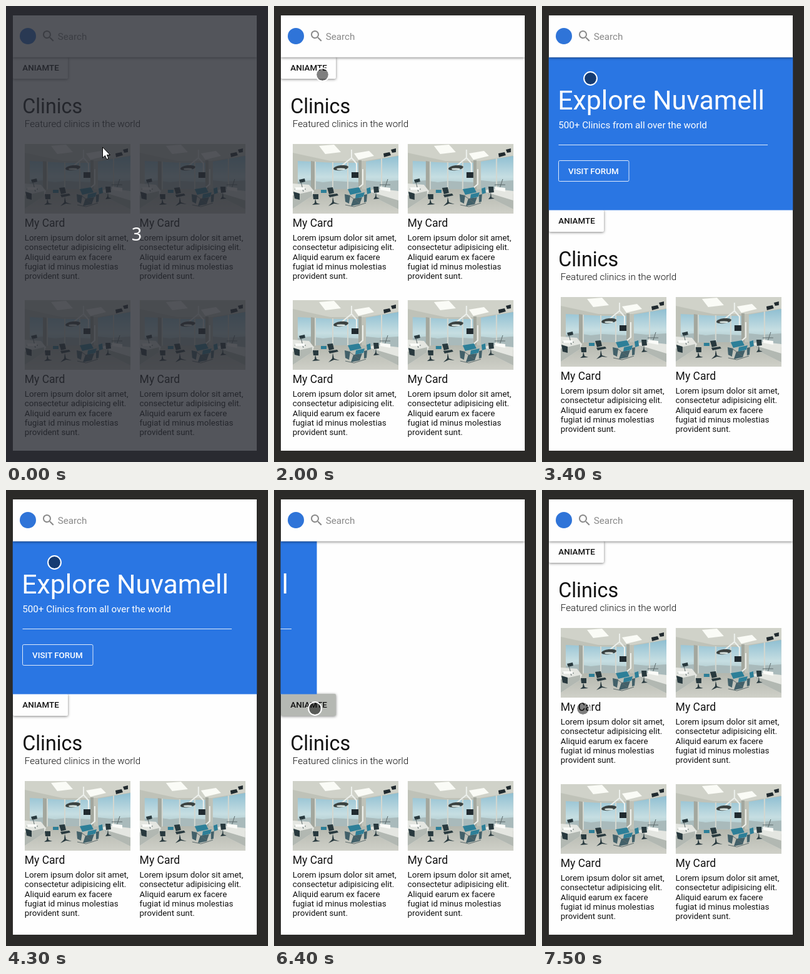
These frames come from a looping animation (419 px wide and 727 px high, 8 s). An HTML page:

```html
<!DOCTYPE html>
<html lang="en">
<head>
<meta charset="utf-8">
<title>Clinics</title>
<style>
html, body { margin: 0; width: 100%; height: 100%; overflow: hidden; background: #2b2a28; }
svg { display: block; width: 419px; height: 727px; font-family: Roboto, sans-serif; fill: #111; }
.btn { font-size: 13.4px; font-weight: 500; }
.h1 { font-size: 42.8px; }
.h2 { font-size: 32.3px; }
.h3 { font-size: 17.5px; }
.sub { font-size: 15.2px; }
.light { font-weight: 300; }
.body { font-size: 13.33px; }
.bar { fill: #fefefe; filter: drop-shadow(0 1px 2px rgba(0, 0, 0, .5)); }
</style>
</head>
<body>
<svg viewBox="0 0 419 727">
  <defs>
    <clipPath id="screen"><path d="M10.500 15h391v694h-391z"/></clipPath>
    <clipPath id="frame"><path d="M0 0h169v111H0z"/></clipPath>
    <linearGradient id="sky" x2="0" y2="1">
      <stop stop-color="#8fbfd2"/><stop offset=".6" stop-color="#c6dee2"/><stop offset="1" stop-color="#a5c0c2"/>
    </linearGradient>
    <linearGradient id="floor" x2="0" y2="1">
      <stop stop-color="#b4b7ae"/><stop offset="1" stop-color="#cfd0c8"/>
    </linearGradient>
    <g id="photo" clip-path="url(#frame)">
      <path fill="#bfc2b8" d="M0 0h169v111H0z"/>
      <path fill="#d0d2c9" d="M0 0h169v18L115 27H60L0 14z"/>
      <path fill="#fafbf6" d="M42 3l24-2 11 12-25 3zM98 15l24-4 8 8-25 6z"/>
      <path fill="url(#sky)" d="M8 27l57 3h40v43H8zM117 28l52-9v56l-52-4z"/>
      <path fill="#a9babb" d="M8 60l20-2 20 3 18-2 39 2v12H8zM117 58l20 2 32-2v17l-52-4z"/>
      <path stroke="#d3d7d0" stroke-width="2" d="M36 28v45M64 29v44M88 29v44M142 23v50"/>
      <path fill="#a3a79e" d="M29 27l6 1v45h-6zM105 26h5v48h-5z"/>
      <path fill="url(#floor)" d="M0 78l40-6h84l45 8v31H0z"/>
      <path fill="#e4e6e1" d="M0 63l26 2 8 10-3 8-31 20zM169 75l-35-4-10 3 6 11 39 19z"/>
      <path fill="#b2b8b2" d="M0 82l31-7v8L0 103zM169 90l-43-13 4 8 39 19z"/>
      <path fill="none" stroke="#edf0ec" stroke-width="2" d="M94 9v13L78 35M94 22l8 9v17M112 40v24l-9 8"/>
      <ellipse cx="77" cy="38" rx="12" ry="4" fill="#3b4241" transform="rotate(-7 77 38)"/>
      <ellipse cx="77" cy="40" rx="7" ry="1.6" fill="#dbe7e4"/>
      <path fill="#202a2f" d="M94 45h11v9H94zM145 15l10-2 2 5-11 3zM157 9l8-2v6l-6 1z"/>
      <g fill="#28393e">
        <path d="M55 70l9-1 2 9-8 2zM57 81l14-2 2 3-14 3zM32 80h9v8h-8zM129 68h8l1 9-8 1zM10 57l9-2 1 5-8 2zM1 76l10 3v10l-8-2z"/>
        <path d="M64 84l2 9 9 3-9-1-9 4 6-6zM36 87l2 7 6 2-13 1 4-3zM133 77l1 8 5 2-10 1 3-4z"/>
      </g>
      <path fill="#2d7f98" d="M88 72l18-3 4 8-18 4zM101 80l14-3-2 7-13 3zM118 71l6-2 1 9-6 2zM45 73h9v5h-9z"/>
      <path fill="#426069" d="M83 80l9 2-2 13-6-3zM97 87l14-2-4 11-14 3zM114 81l5-1-1 12-4 1z"/>
      <path fill="none" stroke="#5b696a" d="M84 97l14 3 19-6M90 82l18 13M13 60l4 16M152 56l-5 15M3 72h18M139 65h17"/>
      <path fill="#fafbf8" d="M4 69h15v4H4zM139 68l17 2v6l-16-3z"/>
    </g>
    <g id="card">
      <use href="#photo"/>
      <text class="h3" x="-.2" y="132">My Card</text>
      <g class="body" id="copy"></g>
    </g>
  </defs>

  <g clip-path="url(#screen)">
    <path fill="#fefefe" d="M11 15h390v694H11z"/>
    <g id="page">
      <rect class="bar" x="11" y="81" width="88" height="35" rx="2"/>
      <rect id="press" x="11" y="81" width="88" height="35" rx="2" fill="#0a1405"/>
      <text class="btn" x="26.3" y="103">ANIAMTE</text>
      <text class="h2" x="26.2" y="171">Clinics</text>
      <text class="sub light" x="29.8" y="193">Featured clinics in the world</text>
      <use href="#card" x="30" y="220"/>
      <use href="#card" x="213.8" y="220"/>
      <use href="#card" x="30" y="469"/>
      <use href="#card" x="213.8" y="469"/>
    </g>
    <g id="banner" fill="#fff">
      <path fill="#2a76e3" d="M10.500 81.500h391v244h-391z"/>
      <text class="h1" x="25.2" y="164.500">Explore Nuvamell</text>
      <text class="sub" x="26.2" y="195">500+ Clinics from all over the world</text>
      <path fill="none" stroke="#dfeafa" d="M26.500 221.500h334.500"/>
      <rect x="26.500" y="246.500" width="112.500" height="33" rx="2" fill="none" stroke="#dfeafa"/>
      <text class="btn" x="42" y="268">VISIT FORUM</text>
    </g>
    <path class="bar" d="M11 15h390v66.700H11z"/>
    <circle cx="35" cy="48" r="13" fill="#2f74d8"/>
    <path fill="#8a8a8a" transform="translate(56 36)" d="M15.5 14h-.8l-.3-.3A6.5 6.5 0 1 0 13.7 14.4l.3.3v.8l5 5 1.5-1.5zM9.5 14a4.5 4.5 0 1 1 0-9 4.5 4.5 0 0 1 0 9z"/>
    <text class="sub" x="82.7" y="54" fill="#8a8a8a">Search</text>
  </g>

  <g id="touch">
    <circle r="9.5" fill="#000" fill-opacity=".5"/>
    <circle r="10.4" fill="none" stroke="#fff" stroke-width="2"/>
  </g>
  <g id="shade">
    <path fill="#282b32" fill-opacity=".8" d="M0 0h419v727H0z"/>
    <text x="209" y="374" text-anchor="middle" fill="#fff" font-size="29" font-family="'Noto Sans', sans-serif">3</text>
  </g>
  <path id="arrow" fill="#fff" stroke="#000" d="M154.5 225v17l4-3.5 2.5 6 3-1.3-2.5-5.7h5z"/>
</svg>

<script>
const el = id => document.getElementById(id);
const clamp = v => Math.max(0, Math.min(1, v));

const copy = ["Lorem ipsum dolor sit amet,", "consectetur adipisicing elit.", "Aliquid earum ex facere",
  "fugiat id minus molestias", "provident sunt."];
el("copy").innerHTML = copy.map((s, i) => `<text x="-.2" y="${154 + i * 15.35}">${s}</text>`).join("");

const LOOP = 8000, STEP = 100, OPEN = 2500, CLOSE = 6200, COLLAPSE = 7500;

// pointer path: time, x, y
const path = [[300, 158, 240], [600, 165, 278], [700, 165, 278], [900, 183, 309], [1000, 190, 289],
  [1100, 190, 289], [1400, 121, 160], [1500, 121, 160], [1800, 82, 114], [1900, 82, 114],
  [2000, 77.5, 109.5], [2400, 77.5, 109.5], [2500, 77.5, 115.5], [4300, 77.5, 115.5],
  [5000, 66, 341], [5300, 66, 341], [5500, 66, 354], [5600, 66, 354], [5700, 65.5, 348.5]];

function pointer(t) {
  const i = path.findIndex(p => p[0] > t);
  if (i < 0) return path.at(-1).slice(1);
  if (i == 0) return path[0].slice(1);
  const [a, b] = [path[i - 1], path[i]], k = (t - a[0]) / (b[0] - a[0]);
  return [a[1] + (b[1] - a[1]) * k, a[2] + (b[2] - a[2]) * k];
}

const slide = dt => 420 * 2 ** (-dt / 88);
const pressed = dt => dt < 0 ? 0 : Math.min(clamp((dt + 100) / 200), clamp((800 - dt) / 300));
const move = (id, x, y) => el(id).setAttribute("transform", `translate(${x} ${y})`);
const fade = (id, o) => el(id).setAttribute("opacity", o);

function draw(now) {
  const t = Math.floor(now % LOOP / STEP) * STEP;
  const open = t >= OPEN && t < COLLAPSE;
  const left = t < CLOSE ? slide(t - OPEN) : 420 - slide(t - CLOSE);
  move("page", 0, open ? 244 : 0);
  move("banner", open ? -Math.round(left) : -420, 0);
  fade("press", .3 * Math.max(pressed(t - OPEN), pressed(t - CLOSE)));
  fade("shade", t < 300 ? 1 : clamp((600 - t) / 400));
  fade("arrow", t < 300 ? 1 : 0);
  fade("touch", t < 300 ? 0 : 1);
  move("touch", ...pointer(t));
}

const start = performance.now();
(function tick() {
  draw(performance.now() - start);
  requestAnimationFrame(tick);
})();
</script>
</body>
</html>
```
